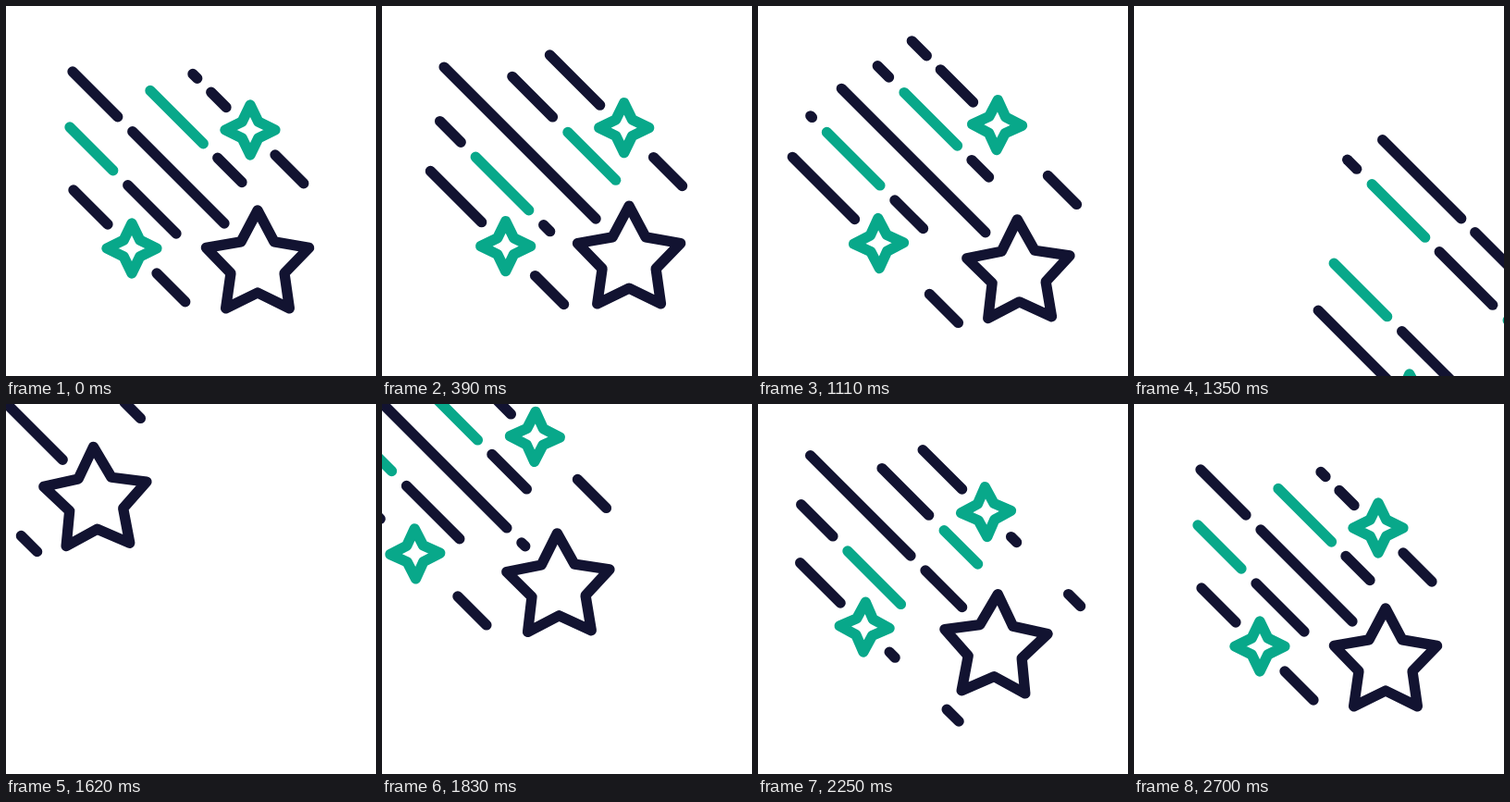
These frames come from a looping animation (400 px wide and 400 px high, 2730 ms). An HTML page with a canvas:

```html
<!DOCTYPE html>
<html lang="en">
<head>
<meta charset="utf-8">
<title>Shooting star</title>
<style>
  html, body { margin: 0; width: 100%; height: 100%; overflow: hidden; background: #fff; }
  canvas { display: block; }
</style>
</head>
<body>
<canvas id="stage" width="400" height="400"></canvas>
<script>
const ctx = document.getElementById('stage').getContext('2d');
const DARK = '#121331', GREEN = '#08a88a';
const LOOP = 2730, REST = 2700, REENTRY = 1420;

// Each body pulls back, shoots off along the diagonal, then glides in again.
const big = { x: 272, y: 279.5, back: 13, launch: 930, push: 400, power: 3.4, from: 81.5, decay: .00353, turn: 1, stretch: 0 };
const upper = { x: 264, y: 134, back: 7, launch: 1000, push: 192, power: 4.2, from: 99, decay: .00373, turn: -1, stretch: .5 };
const lower = { x: 136, y: 262, back: 7, launch: 1000, push: 168, power: 4.1, from: 100.5, decay: .00325, turn: 1, stretch: .06 };

// Dashes [start, length, color] flow back through the window from start to end,
// all measured along x from the body. sway: sine terms that vary the flow speed.
const front = body => ({
  body, diff: body.x - body.y, start: 27, end: 102, fixed: true,
  period: 87, turns: 6, sway: [.075, -.043, -.008, .022], dashes: [[27, 31, DARK]]
});
const lanes = [
  front(upper),
  front(lower),
  { body: upper, diff: 128.5, start: -62, grow: 27, end: -26, slip: .23, drift: .024,
    period: 139, turns: 4, sway: [.15, -.04], dashes: [[-42, 124, DARK]] },
  { body: upper, diff: 64.5, start: -108, grow: 19, end: -9, slip: -.18,
    period: 147, turns: 4, sway: [.0887, -.018], dashes: [[-35, 57.5, DARK], [-108, 57.5, GREEN]] },
  { body: big, diff: 1, start: -200, end: -36,
    period: 294, turns: 2, sway: [.1756, -.017, -.037], dashes: [[-135, 278, DARK]] },
  { body: lower, diff: -62, start: -67, grow: 6, end: 48, slip: .19,
    period: 147, turns: 4, sway: [.0733, -.0195, .012], dashes: [[-4, 57.5, DARK], [-77.5, 57.5, GREEN]] },
  { body: lower, diff: -126, start: -63, grow: 27, end: -26, slip: .33, drift: .024,
    period: 139, turns: 4, sway: [.1138, -.032], dashes: [[-132, 124, DARK]] }
];

const wave = (u, n) => Math.sin(n * Math.PI * u);

function shift(b, t) {
  if (t < REENTRY) {
    const pull = (1 - Math.cos(Math.PI * Math.min(t / b.launch, 1))) / 2;
    const run = Math.max(0, t - b.launch) / (1350 - b.launch);
    return b.push * run ** b.power - b.back * pull;
  }
  const tail = Math.exp(-b.decay * (REST - 1830));
  return -b.from * (Math.exp(-b.decay * (t - 1830)) - tail) / (1 - tail);
}

function drawLane({ body, diff, start, end, fixed, grow = 0, slip = 0, drift = 0, period, turns, sway, dashes }, t) {
  const u = t / REST, move = shift(body, t), surge = Math.max(0, move);
  const progress = sway.reduce((sum, amount, i) => sum + amount * wave(u, i + 1), u);
  const flow = progress * turns * period - slip * surge;
  const x = body.x + move, dy = drift * surge - diff;
  if (!fixed) start -= grow * (wave(u, 1) + .3 * wave(u, 2)) + body.stretch * surge;
  for (const [at, length, color] of dashes) {
    const first = Math.ceil((start - length - at + flow) / period);
    for (let left = at - flow + first * period; left < end; left += period) {
      const a = x + Math.max(left, start), b = x + Math.min(left + length, end);
      if (b - a < .5) continue;
      ctx.strokeStyle = color;
      ctx.beginPath();
      ctx.moveTo(a, a + dy);
      ctx.lineTo(b, b + dy);
      ctx.stroke();
    }
  }
}

function drawStar(b, t, tips, outer, inner, color) {
  const d = shift(b, t);
  const swing = Math.max(0, t - 720) / (REST - 720);
  const tilt = -.05 * b.turn * wave(swing ** 1.5, 2);
  ctx.strokeStyle = color;
  ctx.beginPath();
  for (let i = 0; i < tips * 2; i++) {
    const angle = tilt + i * Math.PI / tips, r = i % 2 ? inner : outer;
    ctx.lineTo(b.x + d + r * Math.sin(angle), b.y + d - r * Math.cos(angle));
  }
  ctx.closePath();
  ctx.stroke();
}

function draw(now) {
  const t = Math.min(now % LOOP, REST);
  ctx.fillStyle = '#fff';
  ctx.fillRect(0, 0, 400, 400);
  ctx.lineWidth = 11.3;
  ctx.lineCap = ctx.lineJoin = 'round';
  for (const lane of lanes) drawLane(lane, t);
  drawStar(upper, t, 4, 27, 12.5, GREEN);
  drawStar(lower, t, 4, 27, 12.5, GREEN);
  drawStar(big, t, 5, 58.5, 30.5, DARK);
}

const begin = performance.now();
function tick() {
  draw(performance.now() - begin);
  requestAnimationFrame(tick);
}
tick();
</script>
</body>
</html>
```
